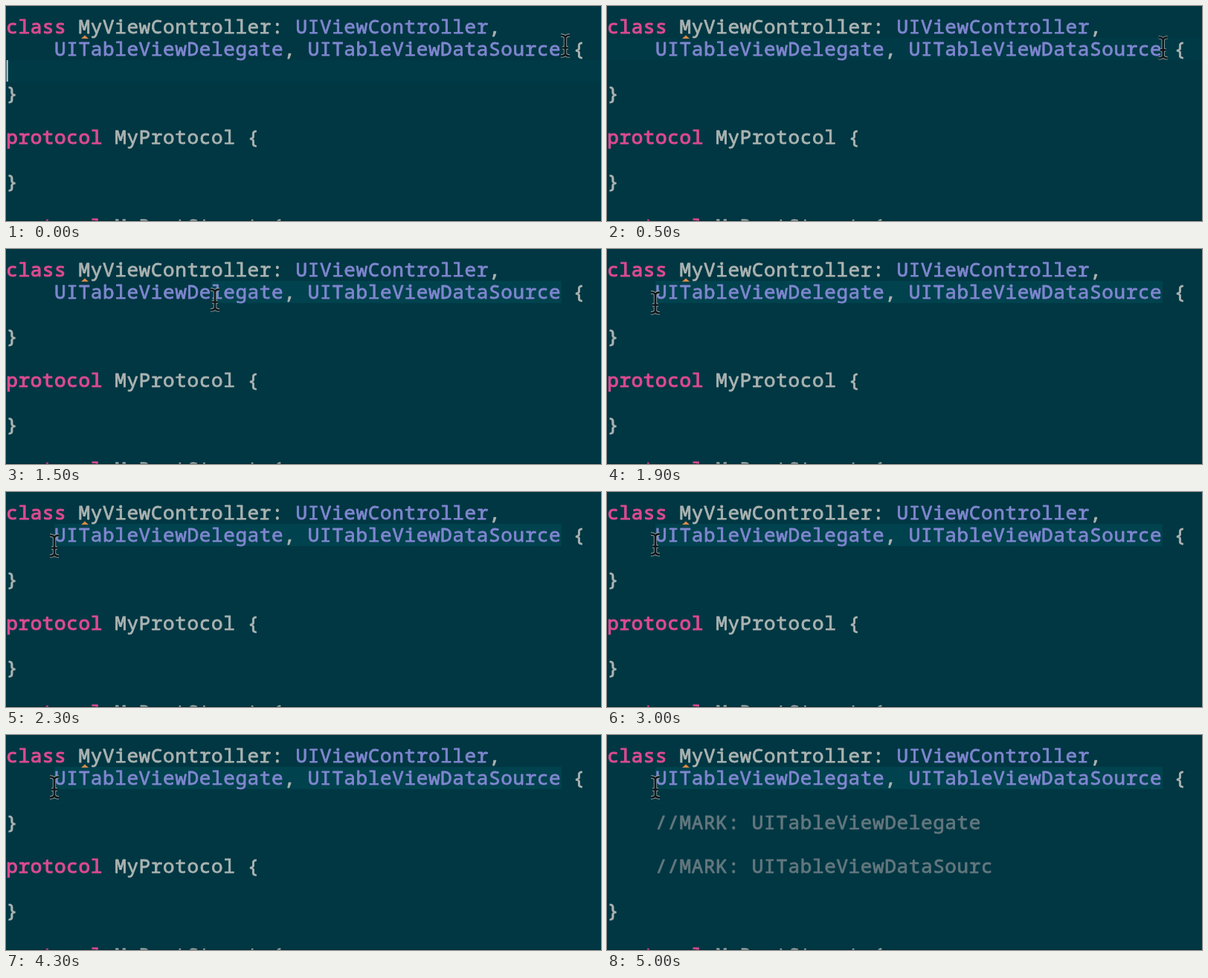
Write an HTML page with a canvas that moves like this. It is 800 px wide and 290 px high and loops after 5.1 s.

```html
<!DOCTYPE html>
<html>
<head>
<meta charset="utf-8">
<style>
  html, body { margin: 0; width: 100%; height: 100%; overflow: hidden; background: #003743; }
  canvas { display: block; }
</style>
</head>
<body>
<canvas id="stage" width="800" height="290"></canvas>
<script>
const ctx = document.getElementById('stage').getContext('2d');
const LOOP = 5100, STEP = 100;
const CHAR = 16.22, LINE = 29.95, BASE = 36.7;
const CARET_OFF = 300, DRAG_START = 1200, INSERT = 4600;
const PINK = '#dc4a90', PLAIN = '#abb3b1', TYPE = '#7f86cf', COMMENT = '#63777e';

// Pointer path: time, x, y
const path = [
  [0, 752, 53.5], [700, 746, 57.5], [DRAG_START, 746, 57.5], [1500, 281, 68.5],
  [1800, 70, 72.5], [1900, 65, 72.5], [2300, 65, 72.5], [2600, 65, 70.5], [LOOP, 65, 70.5]
];

function pointerAt(t) {
  const i = path.findIndex(p => p[0] > t);
  const [t0, x0, y0] = path[i - 1], [t1, x1, y1] = path[i];
  const k = (t - t0) / (t1 - t0);
  return [x0 + (x1 - x0) * k, y0 + (y1 - y0) * k];
}

// A thin stroke gives the medium weight
function text(row, col, str, color) {
  const x = col * CHAR + 0.2, y = BASE + row * LINE;
  ctx.font = '26px "Noto Sans Mono", "Liberation Mono", monospace';
  ctx.letterSpacing = '0.62px';
  ctx.fillStyle = ctx.strokeStyle = color;
  ctx.lineWidth = color === PINK ? 1.1 : 0.8;
  ctx.lineJoin = 'round';
  ctx.fillText(str, x, y);
  ctx.strokeText(str, x, y);
}

function rect(x, y, w, h, color) {
  ctx.fillStyle = color;
  ctx.fillRect(x, y, w, h);
}

function protocol(row, name) {
  text(row, 0, 'protocol', PINK);
  text(row, 9, name + ' {', PLAIN);
}

function drawCode(inserted) {
  text(0, 0, 'class', PINK);
  text(0, 6, 'MyViewController:', PLAIN);
  text(0, 24, 'UIViewController', TYPE);
  text(0, 40, ',', PLAIN);
  text(1, 4, 'UITableViewDelegate', TYPE);
  text(1, 23, ',', PLAIN);
  text(1, 25, 'UITableViewDataSource', TYPE);
  text(1, 47, '{', PLAIN);
  if (inserted) {
    text(3, 4, '//MARK: UITableViewDelegate', COMMENT);
    text(5, 4, '//MARK: UITableViewDataSourc', COMMENT);
  } else {
    text(3, 0, '}', PLAIN);
    protocol(5, 'MyProtocol');
  }
  text(7, 0, '}', PLAIN);
  protocol(9, 'MyRootStruct');

  // Warning mark
  ctx.fillStyle = '#d98a45';
  ctx.beginPath();
  ctx.moveTo(101, 44);
  ctx.lineTo(106, 39.5);
  ctx.lineTo(111, 44);
  ctx.fill();
}

function drawPointer(x, y) {
  const beam = new Path2D();
  for (const s of [-1, 1]) {
    beam.moveTo(-6, s * 14);
    beam.quadraticCurveTo(-1, s * 14, 0, s * 11);
    beam.quadraticCurveTo(1, s * 14, 6, s * 14);
  }
  beam.moveTo(0, -11.5);
  beam.lineTo(0, 11.5);
  beam.moveTo(-4, 3);
  beam.lineTo(4, 3);
  ctx.save();
  ctx.translate(x, y);
  for (const [width, color] of [[4.4, '#93a5a9'], [2.7, '#10181b']]) {
    ctx.lineWidth = width;
    ctx.strokeStyle = color;
    ctx.stroke(beam);
  }
  ctx.restore();
}

function draw(now) {
  const t = Math.floor(now % LOOP / STEP) * STEP;
  const [x, y] = pointerAt(t);
  rect(0, 0, 800, 290, '#003743');
  if (t < CARET_OFF) {
    rect(0, 73, 800, 30, '#003a47');
    rect(0.7, 73, 2, 29, '#c3cccc');
  } else if (t <= DRAG_START) {
    rect(0, 43, 800, 30, '#003a47');
  } else {
    const left = Math.round(x / CHAR) * CHAR;
    rect(left, 43, 747 - left, 30, '#00424e');
  }
  drawCode(t >= INSERT);
  rect(0, 289, 800, 1, 'rgba(0, 20, 28, 0.4)');
  drawPointer(x, y);
  requestAnimationFrame(draw);
}
requestAnimationFrame(draw);
</script>
</body>
</html>
```
